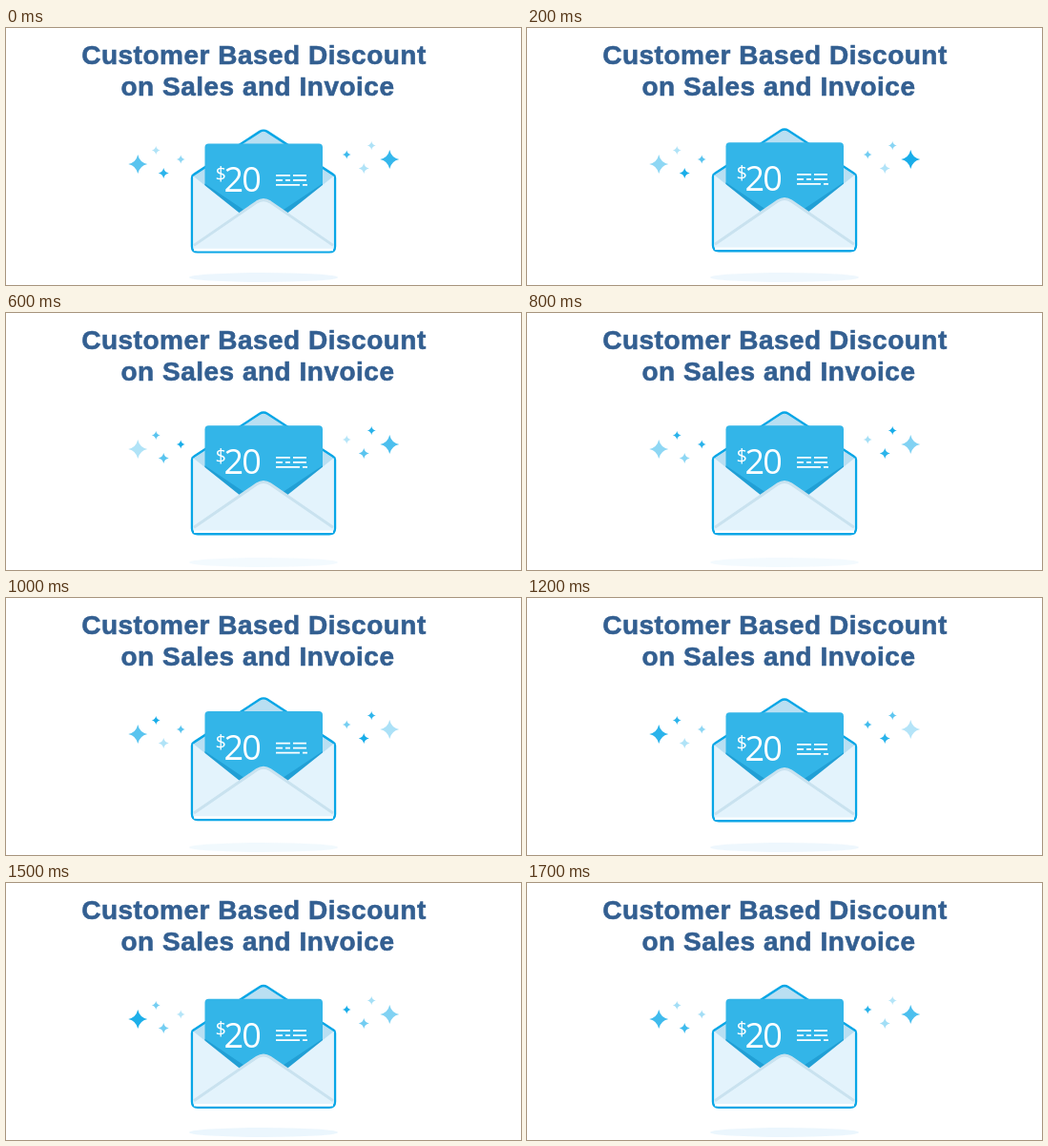
Animation, 540 px wide and 270 px high, one loop 1.8 s. Source, as an HTML page:

```html
<!DOCTYPE html>
<html lang="en">
<head>
<meta charset="utf-8">
<title>Customer Based Discount</title>
<style>
  html, body { margin: 0; width: 100%; height: 100%; overflow: hidden; background: #fff; }
  svg { display: block; width: 540px; height: 270px; }
  .title {
    font: bold 28px "Liberation Sans", Arial, sans-serif; letter-spacing: .5px;
    fill: #335f91; stroke: #335f91; stroke-width: .6; text-anchor: middle;
  }
  .price { font-family: "Open Sans", sans-serif; fill: #fff; }
</style>
</head>
<body>
<svg viewBox="0 0 540 270">
  <g class="title">
    <text x="260" y="38">Customer Based Discount</text>
    <text x="264" y="71">on Sales and Invoice</text>
  </g>
  <ellipse id="shadow" cx="270" cy="262" rx="78" ry="5" fill="#ebf6fd"/>
  <g id="stars" fill="#18ade9"></g>
  <!-- The envelope is centred on x = 0 -->
  <g id="envelope">
    <path d="M-75 156Q-75 153.500 -73 152.500L-4 107.500Q0 105 4 107.500L73 152.500Q75 153.500 75 156V228Q75 234 69 234H-69Q-75 234 -75 228Z"
      fill="#b9dff2" stroke="#08a6e6" stroke-width="2.400"/>
    <path d="M-61.500 200V124q0-4 4-4H58q4 0 4 4V200Z" fill="#33b5e8"/>
    <path d="M-61.500 162L-20 190H20L62 162V200H-61.500Z" fill="#219fd5"/>
    <path d="M-73.800 154L-25 193L-7 181Q0 176 7 181L25 193L73.800 154V228Q73.800 232.800 69 232.800H-69Q-73.800 232.800 -73.800 228Z" fill="#e3f3fc"/>
    <path d="M-73 231.500H73" stroke="#fff" stroke-width="2.500"/>
    <path d="M-73 227L-7 181.500Q0 177 7 181.500L73 227" fill="none" stroke="#c9e2ef" stroke-width="3"/>
    <g class="price">
      <text x="-50.500" y="158.500" font-size="20">$</text>
      <text x="-41.500" y="171" font-size="36" letter-spacing="-1.800">20</text>
    </g>
    <path d="M13 153.500h15m3 0h14M13 158.500h7m3 0h5m3 0h14M13 163.500h25m3 0h5" stroke="#fff" stroke-width="1.700"/>
  </g>
</svg>
<script>
const LOOP = 1800, STEP = 100, CENTER = 270.25, REACH = 132;
const get = id => document.getElementById(id);
const wave = (t, peak) => Math.cos(2 * Math.PI * (t - peak) / LOOP);
const stars = [];

function addStar(x, y, r, peak) {
  const node = document.createElementNS("http://www.w3.org/2000/svg", "path");
  const c = r * .18;
  node.setAttribute("d", `M0 ${-r}Q${c} ${-c} ${r} 0Q${c} ${c} 0 ${r}Q${-c} ${c} ${-r} 0Q${-c} ${-c} 0 ${-r}`);
  node.setAttribute("transform", `translate(${x} ${y})`);
  get("stars").append(node);
  stars.push({ node, peak });
}

// One cluster, mirrored to the right and raised; each side twinkles in its own order
[[REACH, 143, 10], [113, 128.5, 4.5], [87, 138, 4.5], [105, 152.5, 5.5]].forEach(([dx, y, r], i) => {
  addStar(CENTER - dx, y, r, 1400 - 400 * i);
  addStar(CENTER + dx, y - 5, r, 250 + 28 * (REACH - dx));
});

function draw(now) {
  const t = Math.floor(now % LOOP / STEP) * STEP;
  const fall = wave(t, 1600);
  get("envelope").setAttribute("transform", `translate(270 ${1.8 * fall})`);
  get("shadow").setAttribute("opacity", .78 + .22 * fall);
  for (const { node, peak } of stars) node.setAttribute("opacity", .66 + .34 * wave(t, peak));
}

const start = performance.now();
function tick() {
  draw(performance.now() - start);
  requestAnimationFrame(tick);
}
tick();
</script>
</body>
</html>
```
